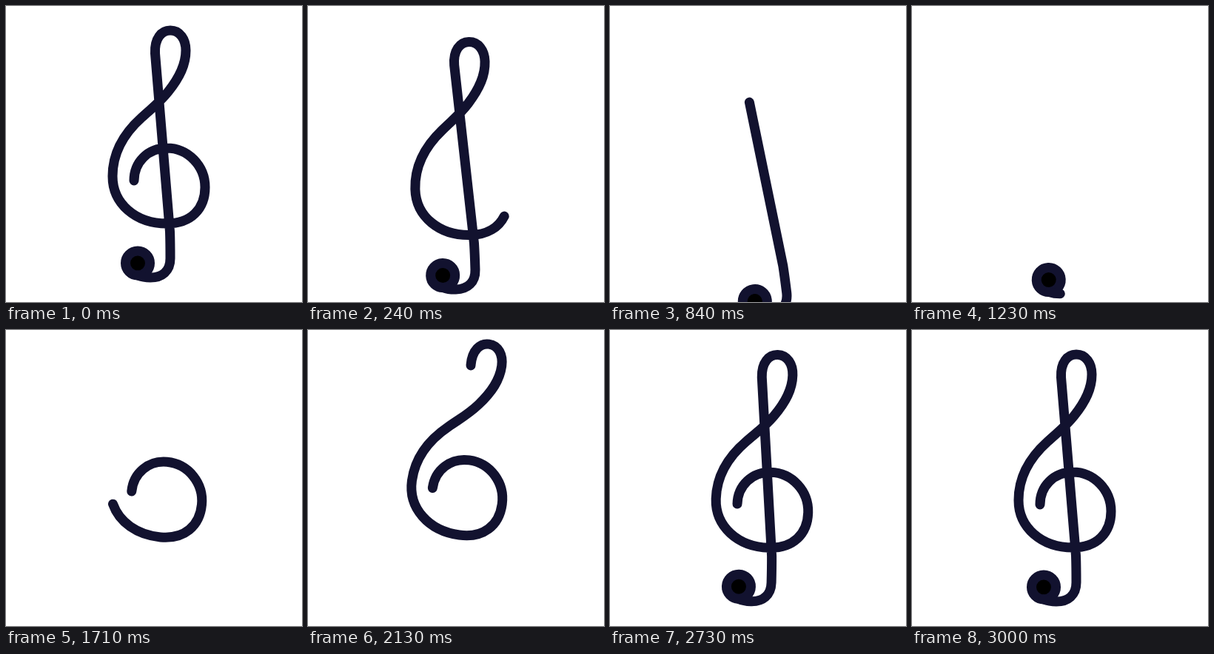
An HTML page with a canvas for the animation above (5.03 s loop, 400 by 400 pixels).

```html
<!DOCTYPE html>
<html lang="en">
<head>
<meta charset="utf-8">
<title>Treble clef</title>
<style>
html, body { margin: 0; width: 100%; height: 100%; overflow: hidden; background: #fff; }
canvas { display: block; width: 100vw; height: 100vh; }
</style>
</head>
<body>
<canvas id="stage" width="400" height="400"></canvas>
<script>
const ctx = document.getElementById('stage').getContext('2d');
const LOOP = 5030, MOVE = 3000, STEP = 30;
const INK = '#12122f';

// From the inner curl, round the body and the top loop, down to the tail.
const CLEF = 'M173 236C173 211 192 192 217 192C246 192 269 216 269 245' +
  'C269 274 250 294 217.5 294C175 294 144 267 144 230' +
  'C144 195 163 169 183 151C197 138 207 131 219 116' +
  'C235 96 243 79 243 60C243 45 235 33 222 33' +
  'C210 33 200.5 44 201.5 64L221.5 305C222 320 222 330 222 341' +
  'C222 358 211 367 195 367C188 367 183 366 178 364';
const clef = new Path2D(CLEF);
const probe = document.createElementNS('http://www.w3.org/2000/svg', 'path');
probe.setAttribute('d', CLEF);
const clefLength = probe.getTotalLength();

const DOT = { x: 178, y: 347.5, r: 16.5 };
const dotLength = 2 * Math.PI * DOT.r;
const total = clefLength + dotLength;

// Keys are [time, value].
const TILT = [[0, 0], [770, -7], [2055, 8], [3000, 0]];
const LIFT = [[0, 0], [665, 54], [1900, -20], [2000, -20], [2770, 0], [3000, 0]];
const ERASE = [[0, 0], [450, 0.312], [1230, 0.8875], [1380, 1]];
const DRAW = [[1380, 0], [1710, 0.295], [2130, 0.586], [2520, 0.952], [2570, 1]];

const smooth = u => u * u * (3 - 2 * u);
const linear = u => u;

function valueAt(keys, t, ease) {
  if (t <= keys[0][0]) return keys[0][1];
  for (let i = 1; i < keys.length; i++) {
    const [t0, a] = keys[i - 1], [t1, b] = keys[i];
    if (t < t1) return a + (b - a) * ease((t - t0) / (t1 - t0));
  }
  return keys[keys.length - 1][1];
}

function drawDot(from, to) {
  if (to - from < 0.1) return;
  const angle = d => Math.PI / 2 + d / DOT.r;
  ctx.beginPath();
  ctx.arc(DOT.x, DOT.y, DOT.r, angle(from), angle(to));
  ctx.fill();
  ctx.stroke();
}

function drawClef(from, to) {
  if (to - from < 0.1) return;
  ctx.setLineDash([to - from, clefLength * 2]);
  ctx.lineDashOffset = -from;
  ctx.stroke(clef);
  ctx.setLineDash([]);
}

function render(t) {
  const erasing = t < ERASE[ERASE.length - 1][0];
  const start = erasing ? total * valueAt(ERASE, t, linear) : 0;
  const end = erasing ? total : total * valueAt(DRAW, t, linear);

  ctx.setTransform(1, 0, 0, 1, 0, 0);
  ctx.fillStyle = '#fff';
  ctx.fillRect(0, 0, 400, 400);
  ctx.translate(200, 200 + valueAt(LIFT, t, smooth));
  ctx.rotate(valueAt(TILT, t, smooth) * Math.PI / 180);
  ctx.translate(-200, -200);

  ctx.lineWidth = 13;
  ctx.lineCap = ctx.lineJoin = 'round';
  ctx.strokeStyle = INK;
  ctx.fillStyle = '#000';
  drawDot(Math.max(0, start - clefLength), end - clefLength);
  drawClef(start, Math.min(end, clefLength));
}

function tick() {
  const t = performance.now() % LOOP;
  render(Math.min(MOVE, Math.floor(t / STEP) * STEP));
  requestAnimationFrame(tick);
}
tick();
</script>
</body>
</html>
```
